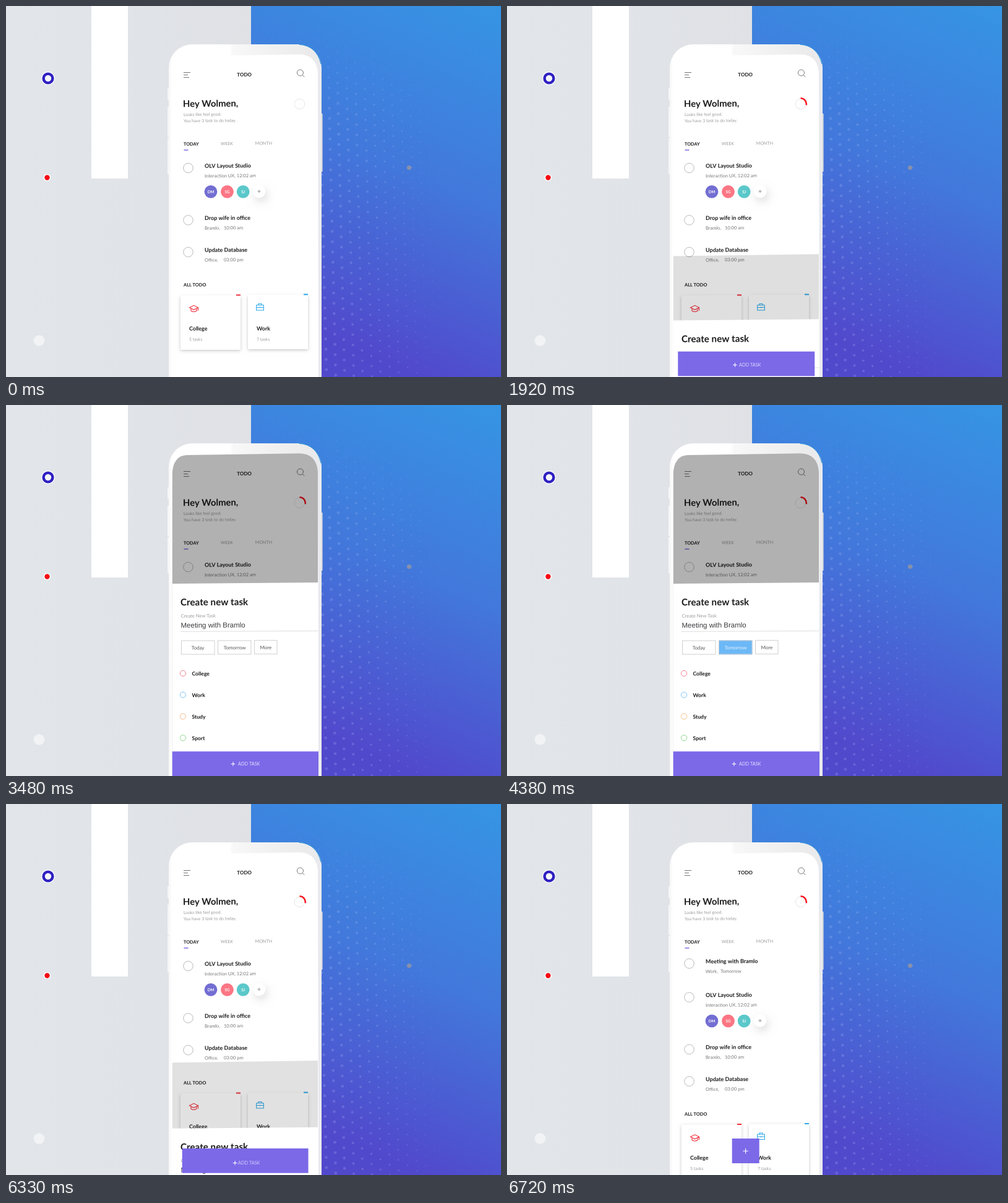
Animation, 800 px wide and 600 px high, one loop 8100 ms. Source, as an HTML page with a canvas:

```html
<!DOCTYPE html>
<html lang="en">
<head>
<meta charset="utf-8">
<title>Todo app</title>
<style>
html, body { margin: 0; width: 100%; height: 100%; overflow: hidden; background: #e1e5e9; }
canvas { display: block; }
</style>
</head>
<body>
<canvas id="stage" width="800" height="600"></canvas>
<script>
const ctx = document.getElementById('stage').getContext('2d');
const LOOP = 8100;
const INK = '#1b1b1d', GREY = '#77777b', PALE = '#9b9b9f';
const PURPLE = '#7b69e8', RED = '#f0303c', BLUE = '#2da8e8';
const TASK = 'Meeting with Bramlo';

const clamp = v => Math.max(0, Math.min(1, v));
const span = (t, from, to) => clamp((t - from) / (to - from));
const ease = v => (1 - Math.cos(Math.PI * clamp(v))) / 2;
const lerp = (a, b, p) => a + (b - a) * p;

function scoped(draw) {
  ctx.save();
  draw();
  ctx.restore();
}

function rect(x, y, w, h, color) {
  ctx.fillStyle = color;
  ctx.fillRect(x, y, w, h);
}

function disc(x, y, r, color) {
  ctx.fillStyle = color;
  ctx.beginPath();
  ctx.arc(x, y, r, 0, 7);
  ctx.fill();
}

function arc(x, y, r, color, width = 1, from = 0, to = 2 * Math.PI) {
  ctx.strokeStyle = color;
  ctx.lineWidth = width;
  ctx.beginPath();
  ctx.arc(x, y, r, from, to);
  ctx.stroke();
}

function stroke(path, color, width = 1) {
  ctx.strokeStyle = color;
  ctx.lineWidth = width;
  ctx.stroke(new Path2D(path));
}

// y is the middle of the capitals; the screen leans slightly, more so near its top
function text(str, x, y, size, color = INK, weight = 400, family = 'Lato') {
  scoped(() => {
    ctx.translate(x, y);
    ctx.rotate(-0.011 * clamp((560 - y) / 450));
    ctx.font = `${weight} ${size}px ${family}, "Liberation Sans", sans-serif`;
    ctx.fillStyle = color;
    ctx.fillText(str, 0, size * 0.36);
  });
}

function plus(x, y, r, color, width = 1) {
  stroke(`M${x - r} ${y}h${2 * r}M${x} ${y - r}v${2 * r}`, color, width);
}

function tapDot(t, start, x, y, r = 5.5) {
  if (t < start || t >= start + 180) return;
  scoped(() => {
    ctx.globalAlpha = 1 - span(t, start + 90, start + 180);
    disc(x, y, r, '#fff');
  });
}

function background() {
  const wall = ctx.createLinearGradient(0, 0, 396, 0);
  wall.addColorStop(0, '#e2e6ea');
  wall.addColorStop(1, '#dfe1e5');
  rect(0, 0, 396, 600, wall);
  rect(138, 0, 59, 279, '#fff');

  const sky = ctx.createLinearGradient(780, 0, 540, 540);
  sky.addColorStop(0, '#3694e4');
  sky.addColorStop(0.5, '#4278db');
  sky.addColorStop(1, '#5149cc');
  rect(396, 0, 404, 600, sky);
  for (let col = 0; col < 24; col++) {
    for (let row = 0; row < 36; row++) {
      const x = 402 + col * 14.6 + row * 0.4;
      const y = 12 + row * 16.6 + (col % 2) * 8.3 + col * 0.5;
      const size = 2.4 * clamp((750 - x) / 215) * clamp(y / 200 + 0.2);
      const alpha = 0.2 * clamp(y / 220 + 0.15) * clamp((750 - x) / 60);
      disc(x, y, size, `rgba(190,205,255,${alpha})`);
    }
  }
  disc(651.5, 261.5, 3.6, '#8790ab');

  disc(68, 117, 11, '#f6f7fa');
  arc(68, 117, 7.4, '#2f20c2', 4.4);
  disc(66.5, 277.5, 5.8, '#fff');
  disc(66.5, 277.5, 4.2, '#f50a14');
  disc(53.5, 541, 8.8, '#f2f3f5');
}

const screenShape = new Path2D(
  'M268.5 600V112Q270 82 292 81L474 78.3Q502 79 504 108L505 600Z');

function phone() {
  rect(261, 133, 3, 19, '#f5f5f6');
  rect(261, 163, 3, 49, '#f5f5f6');
  rect(261, 214, 3, 58, '#f5f5f6');
  rect(509, 174, 2.6, 94, '#d6d7da');
  const body = ctx.createLinearGradient(263, 0, 510, 0);
  body.addColorStop(0, '#f6f6f7');
  body.addColorStop(0.02, '#fff');
  body.addColorStop(0.4, '#fff');
  body.addColorStop(0.42, '#f8f8f8');
  body.addColorStop(0.9, '#ebebec');
  body.addColorStop(1, '#e9eaee');
  ctx.fillStyle = body;
  ctx.beginPath();
  ctx.roundRect(263, 62, 247, 600, 38);
  ctx.fill();
  stroke('M474 62.3Q502 64 509 94', '#2a93d8');
  ctx.fillStyle = '#fff';
  ctx.fill(screenShape);
}

function task(y, title, place, when, whenX) {
  arc(294.5, y + 4, 7.8, '#b9b9bd');
  text(title, 321, y + 0.5, 9, INK, 700);
  text(place, 321, y + 16.7, 7.5, GREY);
  if (when) text(when, whenX, y + 16.4, 7.5, GREY);
}

function card(x, y, title, count, color, icon) {
  scoped(() => {
    ctx.shadowColor = 'rgba(0,0,0,.22)';
    ctx.shadowBlur = 5;
    ctx.shadowOffsetY = 1.5;
    rect(x, y, 97, 88, '#fff');
  });
  rect(x + 90, y - 1.5, 7, 2, color);
  scoped(() => {
    ctx.translate(x, y);
    stroke(icon, color, 1.1);
  });
  text(title, x + 14, 521.5 + y - (x < 300 ? 468 : 467), 8.9, INK, 700);
  text(count, x + 14, 539 + y - (x < 300 ? 468 : 467), 7, PALE);
}

function home(t) {
  stroke('M287 107.5h11M287 111.5h7M287 115.5h9', '#77777b');
  text('TODO', 373.3, 111, 8, INK, 700);
  arc(475.5, 108, 5, '#77777b');
  stroke('M479 111.5l3.3 3.3', '#77777b');

  text('Hey Wolmen,', 286, 158, 14.8, INK, 700);
  text('Looks like feel good.', 287, 175.5, 6.9, PALE);
  text('You have 3 task to do today.', 287, 185.7, 6.9, PALE);
  arc(474.5, 158.5, 8.3, '#e4e4e7');
  const filled = ease(span(t, 540, 1170));
  if (filled) arc(474.5, 158.5, 9.4, '#fa0a18', 2.4, -Math.PI / 2, -Math.PI / 2 + 1.75 * filled);

  text('TODAY', 287, 223.2, 7.3, INK, 700);
  text('WEEK', 347, 222.6, 7, PALE);
  text('MONTH', 402.8, 222, 7.1, PALE);
  rect(287.5, 232.3, 7, 1.3, '#6a55e0');

  const shown = ease(span(t, 6410, 6720));
  scoped(() => {
    ctx.globalAlpha = shown;
    task(254, TASK, 'Work,', 'Tomorrow', 345);
  });

  scoped(() => {
    ctx.translate(0, 50.5 * shown);
    task(258, 'OLV Layout Studio', 'Interaction UX, 12:02 am');
    [['DM', 331, '#736ed2'], ['SG', 357.5, '#fc7684'], ['SJ', 383.2, '#5bc8ca']].forEach(([who, x, color]) => {
      disc(x, 300.3, 10.4, color);
      ctx.textAlign = 'center';
      text(who, x, 300.4, 6.3, '#fff', 700);
      ctx.textAlign = 'left';
    });
    scoped(() => {
      ctx.shadowColor = 'rgba(0,0,0,.13)';
      ctx.shadowBlur = 14;
      ctx.shadowOffsetX = 3;
      ctx.shadowOffsetY = 6;
      disc(409, 299.8, 10.4, '#fff');
    });
    plus(409, 299.8, 2.6, '#8d8d91', 0.9);
    task(342.3, 'Drop wife in office', 'Bramlo,', '10:00 am', 352);
    task(394, 'Update Database', 'Office,', '03:00 pm', 352);

    text('ALL TODO', 287, 450.8, 7.4, INK, 700);
    card(282, 468, 'College', '5 tasks', RED,
      'M14.5 19.8l7-3.5 7 3.5-7 3.5zM17 21.5v3.5q4.5 3 9 0v-3.5M28.5 19.8v5');
    card(391, 467, 'Work', '7 tasks', BLUE,
      'M13.7 16.7h11.6v8.3h-11.6zM17 16.5v-2h5v2M13.7 20.5h11.6M19.5 19.5v2');
  });
}

function chip(label, x, w, textX, y, fill = 0) {
  scoped(() => {
    ctx.globalAlpha = fill;
    rect(x, y, w, 23, '#6cb8f6');
  });
  ctx.strokeStyle = '#d0d0d3';
  ctx.lineWidth = 1;
  ctx.strokeRect(x + 0.5, y + 0.5, w - 1, 22);
  text(label, textX, y + 12, 8, fill > 0.5 ? '#e8f4ff' : '#55555a');
}

function form(t) {
  text('Create new task', 282, 318.8, 15.2, INK, 700);

  const lift = ease(span(t, 2730, 2910));
  const shade = Math.round(lerp(204, 155, lift));
  text('Create New Task', 282.7, lerp(356.5, 341, lift), lerp(9.1, 7.6, lift), `rgb(${shade},${shade},${shade})`);
  const typed = Math.floor((t - 2940) / 30) + 1;
  if (typed > 0) text(TASK.slice(0, typed), 282.5, 356, 11.5, '#3c3c40', 400, '"Liberation Sans"');
  stroke('M282 366.5L505 365.3', '#dedee0');

  const y = 380.7 + 8 * (1 - span(t, 2190, 2310));
  chip('Today', 283, 54.5, 299.7, y);
  chip('Tomorrow', 342, 54.5, 351.7, y - 0.2, ease(span(t, 4110, 4380)));
  chip('More', 401, 37.5, 410.5, y - 0.5);
  tapDot(t, 3990, 369.5, 392);

  [['College', '#f58090'], ['Work', '#7cc6f8'], ['Study', '#f8bd88'], ['Sport', '#8ed88e']].forEach(([name, color], i) => {
    const rowY = 434 + 34.8 * i;
    arc(286, rowY, 4.6, color);
    text(name, 300.5, rowY + 0.5, 8.6, INK, 700);
  });
  tapDot(t, 5160, 304, 468.5, 5);
  const picked = ease(span(t, 5160, 5340));
  if (picked) disc(286, 468.5, 5 * picked, '#12a5fb');
}

function sheet(t, open) {
  if (!open) return;
  const spread = clamp(open * 4.65);
  const left = lerp(364, 268.5, spread), right = lerp(408, 505, spread);
  const top = lerp(600, 78, open), slide = 311 * (1 - ease((open - 0.12) / 0.7));
  const lean = 2.8 * spread;

  scoped(() => {
    ctx.clip(screenShape);
    ctx.fillStyle = `rgba(0,0,0,${0.305 * Math.min(1, open * 1.1)})`;
    ctx.beginPath();
    ctx.moveTo(left, top + (open < 1 ? 0.5 : -5));
    ctx.lineTo(right - spread, top - lean);
    ctx.lineTo(right - spread, 600);
    ctx.lineTo(left, 600);
    ctx.fill();

    const panel = new Path2D(`M${left} ${289 + slide}L${right} ${289 + slide - 2 * spread}V600H${left}Z`);
    ctx.fillStyle = '#fff';
    ctx.fill(panel);
    ctx.clip(panel);
    ctx.translate(0, slide);
    form(t);
  });
}

function actionButton(t, open) {
  const grow = ease(span(t, 540, 1000));
  if (!grow) return;
  const wide = ease((open - 0.13) / 0.3);
  const drop = clamp(open / 0.19);
  const left = lerp(363.7, 268.7, wide), right = lerp(407.7, 505, wide);
  const top = lerp(541, 560.3, wide), bottom = lerp(581, 600, wide);
  scoped(() => {
    ctx.translate(385.7, 561);
    ctx.scale(grow, grow);
    ctx.translate(-385.7, -561);
    rect(left, top, right - left, bottom - top, PURPLE);
    plus(lerp(385.6, 367, wide), lerp(561.3, 580.5, drop), lerp(4.2, 3.2, wide), '#fff', 1.1);
    ctx.globalAlpha = wide;
    text('ADD TASK', 375, 580.5, 7.3, '#e4dfff');
  });
  tapDot(t, 1410, 385.6, 561.5);
  tapDot(t, 6060, 385.6, 581);
}

function frame(now) {
  const t = now % LOOP;
  const travel = t < 4000 ? span(t, 1560, 2226) : 1 - span(t, 6090, 6590);
  const open = travel ** 1.6;
  background();
  phone();
  scoped(() => {
    ctx.clip(screenShape);
    home(t);
  });
  sheet(t, open);
  actionButton(t, open);
}

const start = performance.now();
function loop() {
  frame(performance.now() - start);
  requestAnimationFrame(loop);
}
loop();
</script>
</body>
</html>
```
